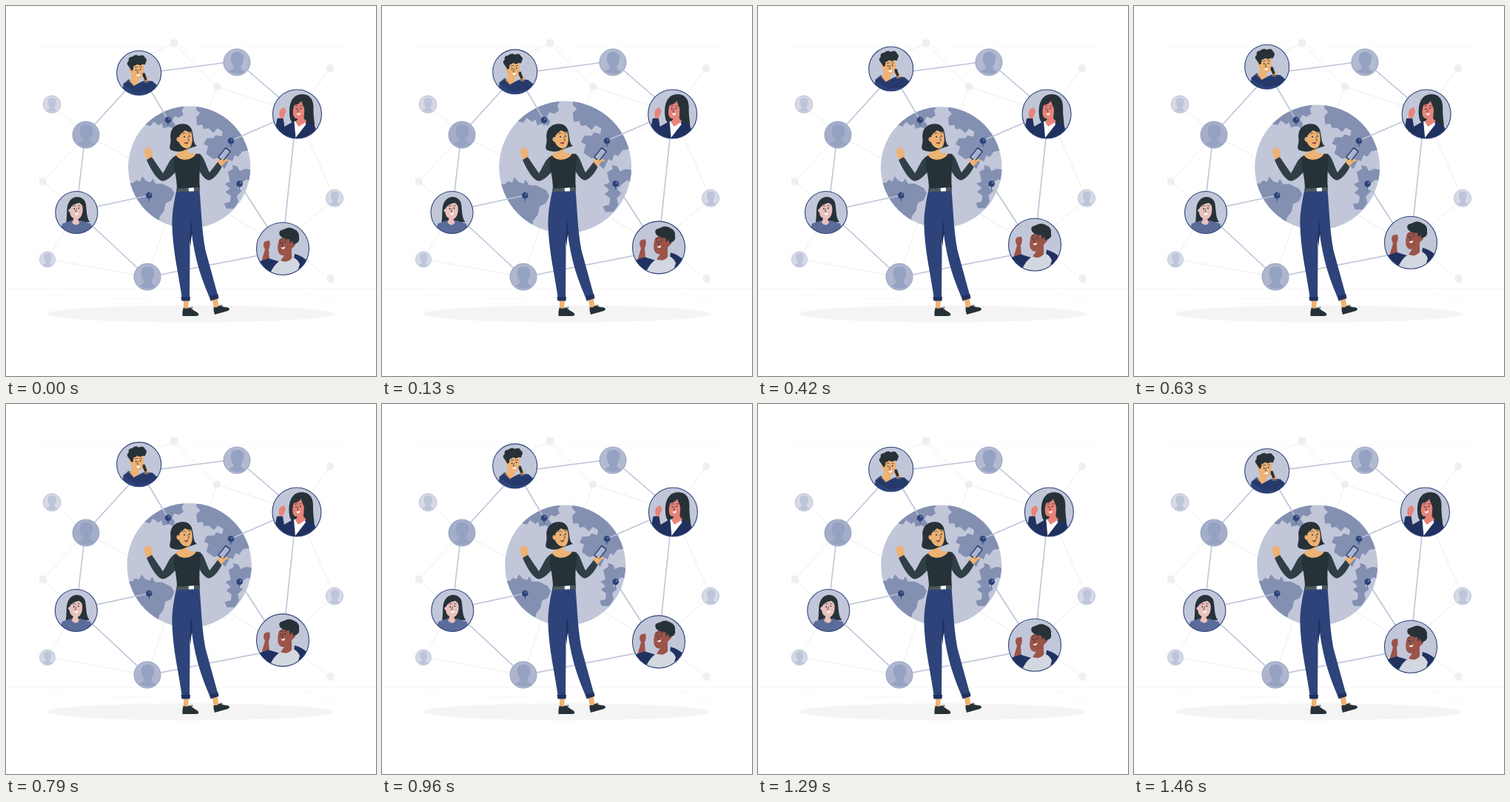
Animation of 500 by 500 pixels, one loop 1500 ms. Source, as an HTML page:

```html
<!DOCTYPE html>
<html lang="en">
<head>
<meta charset="utf-8">
<title>Connected world</title>
<style>
  html, body { margin: 0; height: 100%; overflow: hidden; background: #fff; }
  svg { display: block; width: 100vw; height: 100vh; }
  .dark { fill: #263238; }
  .navy { fill: #2d4379; }
  .deep { fill: #20315f; }
  .skin { fill: #edb274; }
  .brown { fill: #9c5449; }
  .coral { fill: #e8837a; }
  .rose { fill: #e9c0bb; }
  .pale { fill: #c1c7d9; }
  .land { fill: #8390b2; }
  .line { fill: none; stroke: #263238; stroke-width: .7; stroke-linecap: round; }
  .thin { fill: none; stroke: #ededed; }
  .link { fill: none; stroke: #bcc2d7; stroke-width: 1.5; }
</style>
</head>
<body>
<svg viewBox="0 0 500 500">
  <defs>
    <clipPath id="globeClip"><circle cx="247.7" cy="218" r="81.5"/></clipPath>
    <path id="bust" d="M-7,-12 C-4,-16 6,-16 9,-11 C11,-5 9,2 6,5 L6,9 L12,14 Q0,20 -12,13 L-5,9 L-5,5 C-9,2 -10,-7 -7,-12Z"/>
    <g id="pin">
      <path class="navy" d="M-.7,2 H.7 L.3,8 H-.3Z"/>
      <circle class="navy" r="4.3"/>
      <circle cx="1.2" cy="-1.4" r="1.2" fill="#6d7dab"/>
    </g>
  </defs>

  <g class="thin" stroke-width=".8">
    <path stroke="#f3f3f3" d="M0,382.5 H500"/>
    <path stroke="#f9f9f9" d="M39,55.5 H243 V337.5 H39Z M254,55.5 H457.5 V337.5 H254Z"/>
    <path stroke="#f6f6f6" d="M52,391 H83 M88,391 H97 M136,395.5 H195 M400,389.5 H416 M418,398.5 H448"/>
  </g>
  <ellipse cx="249.5" cy="416" rx="193.5" ry="11.5" fill="#f4f4f4"/>
  <path class="thin" d="M180,72 L227,50 L285,109 L394,145 L438,84 M285,109 L247,218 M394,145 L444,260 L374,320 L438,368
    M62,133 L108,174 L50,237 L95,278 L56,342 L191,366 L241,218 M108,174 L247,249 L374,326"/>
  <g id="dots" fill="#efefef"></g>

  <g id="globe">
    <circle class="pale" cx="247.7" cy="218" r="81.5"/>
    <g class="land" clip-path="url(#globeClip)">
      <path d="M184,165 L189,161 196,163 200,157 207,162 211,159 213,166 221,164 227,167 229,161 225,156 228,150 234,152 240,148 238,142 242,135 215,132 182,155Z"/>
      <path d="M257,134 L257,141 262,146 257,151 258,162 265,161 267,167 273,166 280,172 285,166 292,170 291,177 283,175 280,179 271,179 267,187 273,190 270,200 280,207 287,205 290,216 295,220 301,208 305,210 308,202 313,204 318,197 333,194 320,130Z"/>
      <path d="M299,224 L306,220 305,215 312,217 315,223 322,220 334,222 332,238 324,234 317,239 312,246 318,249 311,256 313,264 307,273 297,273 294,266 302,264 303,256 296,251 302,246 295,240 302,237Z"/>
      <path d="M160,238 L173,239 177,235 182,237 185,230 190,236 196,238 199,233 203,240 212,240 224,246 228,253 224,262 216,266 214,276 208,284 206,302 180,310Z"/>
    </g>
  </g>
  <path class="link" d="M107,174 L180,94 M180,91.8 L312,74.5 L392.6,144 L373,331 L191,366.5 L95,277 L107,174
    M180,88 L219,154 M394,142.6 L304,182 M316,241 L374,331 M95,277 L193,256"/>
  <g id="small"></g>
  <g id="pins"></g>

  <g id="woman">
    <path class="skin" d="M240,396 L247,396 246,410 240,410Z M278,394 L285,392 288,407 281,408Z"/>
    <path class="dark" d="M239.5,408 Q245,410 249,407 C252,412 260,413 260.5,417 Q260,419 257,419 H238.5 Q238,413 239.5,408Z"/>
    <path class="dark" d="M280.5,407 Q285,408 289,404.5 C294,408 300,406 302,409 Q302,411.5 298,412.5 L282,417 Q280,412 280.5,407Z"/>
    <path class="line" d="M249,410 q1,-4 3,-3 q1,2 -3,3 M289,407 q1,-4 3,-3 q1,2 -3,3"/>
    <path class="navy" d="M247,250 L261.5,249 C264,275 264,300 269.5,330 L286.5,392 276,396 C266,372 254,345 249,290Z"/>
    <path class="deep" d="M249,277 L252,306 Q250,312 249.5,325 L247,310Z"/>
    <path class="navy" d="M230,250.5 L253,250 C251,275 248,300 248.5,335 L248,396 238,396 C233,360 226,335 224.5,298 C224,280 227,265 230,250.5Z"/>
    <path class="deep" d="M236.5,393 L249,393 248.5,398.5 237.5,398.5Z M275,392.5 L286.5,389.5 287.5,395 276.5,398.5Z"/>

    <path class="skin" d="M192,209 C188,204 187,200 187,196 Q187,192 190,194 Q190,190 193,191.5 C196,192 198,196 197.5,200 L198,207Z"/>
    <path class="skin" d="M285,213 L287,206 291,204 299,207 Q300,209 297,210 L291,217Z"/>
    <g transform="translate(295 200.5) rotate(38)">
      <rect class="deep" x="-4.7" y="-9" width="9.4" height="18" rx="1.5"/>
      <rect x="-3.5" y="-7.5" width="7" height="15" fill="#a9b3d2"/>
    </g>
    <path class="skin" d="M286,209 L293,207 q3,1 0,3 l-2,5Z"/>
    <circle class="skin" cx="299.5" cy="209" r="1.3"/>

    <g fill="#303e45">
      <path d="M230,203 C221,204 218,218 212,226 L197,204 190,208 C196,222 205,236 212,236.5 C219,236 226,228 231,222Z"/>
      <path d="M261,199.5 C268,203 270,216 275,225 L286,211 291.5,217.5 C286,229 278,236 273,235.5 C267,233 262,225 259,218Z"/>
    </g>
    <path class="skin" d="M227,203 L235,197 236,186 246,190 246,198 258,200 252,210 235,210Z"/>
    <path class="dark" d="M226.5,204 L230,202 C235,210 251,210 257,199.5 L262,200 C265,207 260,220 262,246 L231,247.5 C231,230 226,220 226.5,204Z"/>
    <path fill="#4b5960" d="M230,247 L262,245 262,250 230,251.5Z"/>
    <path fill="#fff" d="M246.5,246 L254,245.5 254,250.3 247,250.6Z"/>

    <path class="dark" d="M236,159.5 C226,161 221,169 222.5,179 C223,187 220,190 222,194 C229,198 238,197 243,194 L258,189 C253,186 254,180 252,171 C251,162 244,158 236,159.5Z"/>
    <path class="skin" d="M234,178 C234,173 239,171 242,168 Q247,171 250.5,170 C253,179 252,190 247,192 C242,194 235,189 234,184 Q229,182 231,178 Q232,176 234,178Z"/>
    <path class="line" d="M238.5,173 q2,-2 4,-1 M246.5,171.7 q2,-1 3.5,0 M245.5,177 l2.2,4 -2,.5"/>
    <circle class="dark" cx="241" cy="176.7" r="1"/><circle class="dark" cx="248" cy="175.7" r="1"/>
    <path fill="#8d3838" d="M240,184 Q243,185.5 246.5,183 Q246,187 242.5,186.5Z"/>
  </g>
  <g id="people"></g>
</svg>

<script>
const $ = id => document.getElementById(id);
const face = (x, y, gap = 6) =>
  `<circle class="dark" cx="${x}" cy="${y}" r=".9"/><circle class="dark" cx="${x + gap}" cy="${y - .8}" r=".9"/>
   <path class="line" d="M${x - 1.5},${y - 3.5} q2,-1.5 3.5,-.5 M${x + gap - 1},${y - 4} q2,-1 3,0 M${x + 3},${y} l-1.5,3.5 1.5,.4"/>
   <path fill="#fff" d="M${x},${y + 6.5} q3,.5 5.5,-1.5 q0,3.5 -2.5,3.5 q-2,0 -3,-2z"/>`;

const people = [
  { x: 179.7, y: 90.8, r: 30, float: true, art: `
    <path class="navy" d="M-24,32 L-21,15 -13,9 -5,16 5,11 18,11 25,17 30,32Z"/>
    <path class="skin" d="M-10,2 L-12,-2 Q-15,-6 -11,-7 L-10,-14 5,-14 C8,-4 6,6 1,8 L-1,8 0,13 -7,18 -14,11 Q-9,9 -10,2Z"/>
    <path class="dark" d="M-10,-3 L-14,-9 Q-18,-13 -14,-16 Q-15,-22 -9,-22 Q-5,-26 0,-23 Q6,-26 8,-21 Q12,-18 9,-14 Q9,-10 5,-12 Q1,-9 -2,-12 Q-6,-9 -7,-10 L-8,-4Z"/>
    <path class="skin" d="M6,4 Q11,3 12,7 L13,13 7,13Z"/>
    <path class="dark" d="M5,0 L8,0 11,9 8,10 5,4Z"/>
    <path class="deep" d="M-22,15 L-14,8 -7,17 5,13 7,10 16,11 25,19 22,24 -3,27Z" opacity=".5"/>
    ${face(-4, -4)}` },
  { x: 374, y: 328.3, r: 35.5, float: true, art: `
    <path class="brown" d="M-29,18 L-24,1 Q-28,-6 -24,-10 L-18,-11 Q-16,-5 -19,1 L-18,16Z"/>
    <path class="deep" d="M-36,38 L-31,17 -19,13 -3,18 -16,38Z M16,7 Q26,9 36,19 L34,38 12,38Z"/>
    <path fill="#d2d7e0" d="M-19,38 Q-13,21 -3,16 L14,12 Q20,14 23,21 L18,38Z"/>
    <path class="brown" d="M-5,-12 L4,-19 17,-12 17,-5 12,0 12,13 Q6,20 -3,16 L2,9 C-8,10 -8,-2 -5,-12Z"/>
    <path class="dark" d="M-4,-18 Q-7,-25 1,-26 Q9,-31 16,-26 Q23,-23 22,-15 Q24,-8 14,-6 L13,-11 10,-7 9,-13 Q0,-13 -4,-18Z"/>
    ${face(-2.5, -8)}` },
  { x: 393.6, y: 146, r: 33, art: `
    <path class="dark" d="M-9,8 C-13,-8 -9,-25 4,-26.5 C19,-28 23,-17 22,-5 C22,8 26,19 22,28 L4,30Z"/>
    <path class="deep" d="M-27,6 L-19,5 -17,17 -5,10 12,9 24,17 32,40 -33,40Z"/>
    <path class="coral" d="M-23,6 Q-26,-3 -22,-7 L-17,-9 -15,-3 -19,6Z"/>
    <path fill="#fff" d="M-4,10 L-2,32 12,14 10,8Z"/>
    <path class="coral" d="M-4,-12 Q3,-13 6,-18 L10,-6 9,6 13,10 2,17 -2,11 1,6 C-6,7 -7,-2 -4,-12Z"/>
    <path class="dark" d="M-5,-11 Q-1,-18 6,-18 Q7,-12 10,-9 L10,4 L13,11 20,14 Q24,-12 11,-20 Q-3,-24 -7,-11Z"/>
    ${face(-1, -7)}` },
  { x: 95.5, y: 279, r: 28.5, art: `
    <path class="dark" d="M-14,13 C-12,2 -15,-8 -9,-16 Q-3,-23 6,-20 Q13,-17 13,-7 C14,2 14,8 18,13Z"/>
    <path fill="#5b6b9a" d="M-24,30 L-19,15 -7,11 6,11 19,15 25,30Z"/>
    <path class="rose" d="M-9,-5 Q-8,-12 -2,-15 L7,-12 C10,-4 8,7 2,9 L4,14 Q0,20 -6,14 L-4,8 Q-9,5 -9,0 Q-13,-3 -9,-5Z"/>
    <path class="dark" d="M-10,-6 Q-8,-18 2,-18 Q10,-17 11,-5 Q6,-12 4,-13 Q-5,-12 -9,-5Z"/>
    ${face(-3, -5)}` },
];

const at = (x, y, body) => `<g transform="translate(${x} ${y})">${body}</g>`;

$('dots').innerHTML = [[227, 50], [285, 109], [438, 84.5], [50, 237], [438.5, 368.5]]
  .map(([x, y]) => `<circle cx="${x}" cy="${y}" r="5.4"/>`).join('');

$('small').innerHTML = [
  [62, 133, 11.8], [444, 259.7, 11.5], [56, 342.5, 10.5],
  [108, 174, 18, '#a4aec9'], [312, 76, 18, '#b2bad1'], [191, 366, 18, '#adb6ce'],
].map(([x, y, r, fill]) => at(x, y, `
  <circle r="${r}" fill="${fill || '#d6dae6'}" stroke="${fill ? '#919dc0' : '#b5bdd3'}" stroke-width=".9"/>
  <use href="#bust" fill="${fill ? '#96a2c2' : '#bec5d9'}" transform="scale(${r / 19})"/>`)).join('');

$('pins').innerHTML = [[219, 154], [304, 182.3], [315.7, 240.3], [193.3, 256]]
  .map(([x, y]) => at(x, y, '<use href="#pin"/>')).join('');

$('people').innerHTML = people.map(({ r, art }, i) => `<g>
  <clipPath id="face${i}"><circle r="${r}"/></clipPath>
  <circle class="pale" r="${r}"/><g clip-path="url(#face${i})">${art}</g>
  <circle r="${r}" fill="none" stroke="#2d4379" stroke-width="1.1"/></g>`).join('');
const groups = [...$('people').children];

const LOOP = 1500, STEPS = 36;
const FLOAT = [[0, 0], [50, -10], [100, 0]];
const SHAKE = [[0, 0], [10, -1], [20, 2], [30, -4], [40, 4], [50, -4], [60, 4], [70, -4], [80, 2], [90, -1], [100, 0]];
const BEAT = [[0, 1], [10, 1.1], [30, 1], [50, 1.055], [60, 1], [100, 1]];

// Linear interpolation between [percent, value] keys.
function track(keys, p) {
  const i = keys.findIndex(k => k[0] > p);
  const [a, u] = keys[i - 1], [b, v] = keys[i];
  return u + (v - u) * (p - a) / (b - a);
}

function draw(now) {
  const step = Math.floor((now + 5) % LOOP / LOOP * STEPS);
  const p = (step + .5) / STEPS * 100;
  people.forEach(({ x, y, float }, i) => {
    const dx = float ? 0 : track(SHAKE, p), dy = float ? track(FLOAT, p) : 0;
    groups[i].setAttribute('transform', `translate(${x + dx} ${y + dy})`);
  });
  $('globe').setAttribute('transform', `translate(247.7 218) scale(${track(BEAT, p)}) translate(-247.7 -218)`);
}

const start = performance.now();
function tick() {
  draw(performance.now() - start);
  requestAnimationFrame(tick);
}
tick();
</script>
</body>
</html>
```
